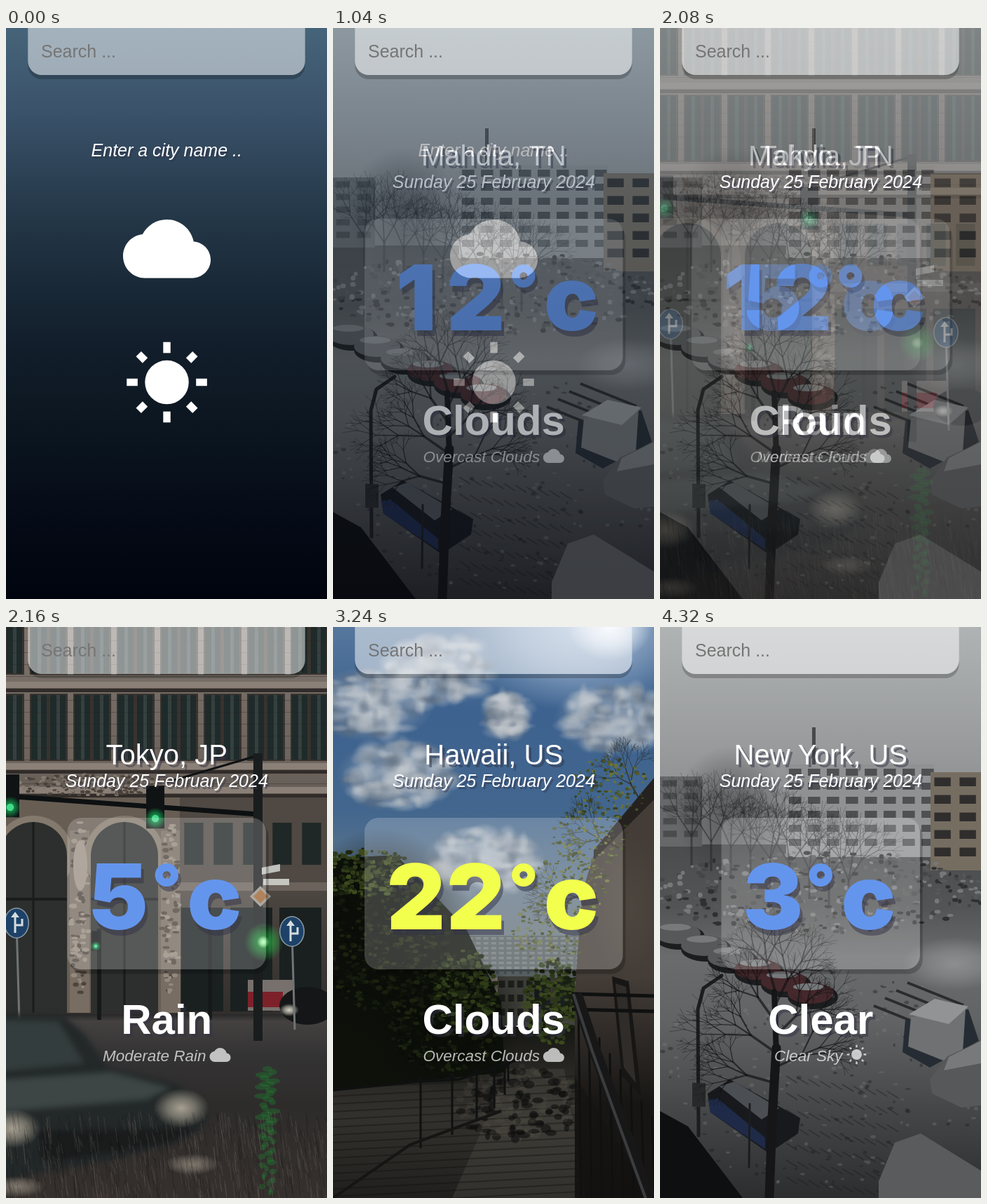
An HTML page with a canvas that plays this animation: 458x814 px, repeating every 5320 ms.

```html
<!DOCTYPE html>
<html lang="en">
<head>
<meta charset="utf-8">
<title>Weather</title>
<style>
html, body { margin: 0; width: 100%; height: 100%; overflow: hidden; background: #000; }
canvas { display: block; }
</style>
</head>
<body>
<canvas id="stage" width="458" height="814"></canvas>
<script>
const W = 458, H = 814, MID = 229.25, TAU = Math.PI * 2;
const SANS = '"Liberation Sans", Arial, sans-serif';
const HEAVY = 'Inter, Roboto, sans-serif';
let c, seed;

const rnd = () => (seed = (seed * 16807) % 2147483647) / 2147483647;
const between = (a, b) => a + (b - a) * rnd();

// ---- drawing helpers ----
function rect(color, x, y, w, h) {
  c.fillStyle = color;
  c.fillRect(x, y, w, h);
}
function poly(color, ...p) {
  c.fillStyle = color;
  c.beginPath();
  for (let i = 0; i < p.length; i += 2) c.lineTo(p[i], p[i + 1]);
  c.fill();
}
function line(color, width, ...p) {
  c.strokeStyle = color;
  c.lineWidth = width;
  c.beginPath();
  for (let i = 0; i < p.length; i += 2) c.lineTo(p[i], p[i + 1]);
  c.stroke();
}
function oval(color, x, y, rx, ry = rx) {
  c.fillStyle = color;
  c.beginPath();
  c.ellipse(x, y, rx, ry, 0, 0, TAU);
  c.fill();
}
// soft spot; rgb is "r,g,b"
function glow(rgb, alpha, x, y, rx, ry = rx) {
  c.save();
  c.translate(x, y);
  c.scale(rx, ry);
  const g = c.createRadialGradient(0, 0, 0, 0, 0, 1);
  g.addColorStop(0, `rgba(${rgb},${alpha})`);
  g.addColorStop(0.5, `rgba(${rgb},${alpha * 0.6})`);
  g.addColorStop(1, `rgba(${rgb},0)`);
  c.fillStyle = g;
  c.fillRect(-1, -1, 2, 2);
  c.restore();
}
// vertical gradient; stops alternate y and colour
function shade(x, w, ...stops) {
  const y0 = stops[0], h = stops[stops.length - 2] - y0;
  const g = c.createLinearGradient(0, y0, 0, y0 + h);
  for (let i = 0; i < stops.length; i += 2) g.addColorStop((stops[i] - y0) / h, stops[i + 1]);
  rect(g, x, y0, w, h);
}
// calls put(x, y, i) at n random places inside an ellipse
function spread(n, x, y, rx, ry, put) {
  for (let i = 0; i < n; i++) {
    const a = rnd() * TAU, d = Math.sqrt(rnd());
    put(x + Math.cos(a) * d * rx, y + Math.sin(a) * d * ry, i);
  }
}
function dabs(n, colors, x, y, rx, ry, size) {
  spread(n, x, y, rx, ry, (px, py, i) =>
    oval(colors[i % colors.length], px, py, size * between(0.5, 1.3), size * between(0.4, 0.9)));
}
function branch(color, x, y, len, angle, width, depth) {
  const x2 = x + Math.cos(angle) * len, y2 = y + Math.sin(angle) * len;
  line(color, width, x, y, x2, y2);
  if (!depth) return;
  for (const turn of [-0.5, 0.05, 0.55])
    branch(color, x2, y2, len * between(0.6, 0.88), angle + turn + between(-0.2, 0.2),
      Math.max(0.5, width * 0.62), depth - 1);
}
function building(x, y, w, h, wall, pane, dx, dy) {
  rect(wall, x, y, w, h);
  for (let py = y + dy * 0.3; py < y + h - dy * 0.5; py += dy)
    for (let px = x + dx * 0.15; px < x + w - dx * 0.5; px += dx) rect(pane, px, py, dx * 0.65, dy * 0.5);
}

// ---- backdrops ----
function night() {
  shade(0, W, 0, '#466479', 120, '#3a526a', 250, '#263a4b', 350, '#1b2b3a', 450, '#121e2b',
    550, '#0c1721', 620, '#09121c', 680, '#060c18', H, '#00040e');
}

function snow() {
  shade(0, W, 0, '#b0b3b4', 70, '#a6a9aa', 180, '#97999b', 320, '#808183');
  shade(0, W, 310, '#4b4c4d', 400, '#535455', 470, '#6a6b6c', 560, '#626364', 680, '#474849', H, '#2c2d2f');

  building(0, 213, 60, 100, '#66686a', '#4a4c4e', 30, 18);
  building(180, 196, 212, 132, '#8f9192', '#4e5052', 27, 20);
  building(386, 207, 72, 140, '#766d61', '#302e2d', 36, 25);
  rect('#47494b', 217, 143, 5, 53);

  // bare park
  glow('45,46,48', 0.5, 100, 265, 80, 95);
  dabs(500, ['#2f3031', '#454647', '#77787a', '#565758'], MID, 378, 240, 58, 4);
  for (let i = 0; i < 9; i++)
    branch('rgba(38,39,41,.55)', 45 + i * 28, 340 + i * 8, 42, -1.57, 3, 4);
  glow('150,151,153', 0.8, 420, 480, 75, 38);

  // row of parked cars
  for (let i = 0; i < 6; i++) {
    const x = 25 + i * 38, y = 437 + i * 17;
    oval('#1c1d1f', x + 3, y + 5, 36, 18);
    oval(i > 2 ? '#44282b' : '#56585a', x, y, 33, 15);
    oval('#77797b', x - 3, y - 9, 22, 5);
  }
  dabs(260, ['rgba(30,31,33,.4)', 'rgba(130,131,133,.3)'], MID, 640, 240, 160, 3);
  for (let i = 0; i < 70; i++)
    line('rgba(28,29,31,.45)', 1.5, 180 + (i % 10) * 16, 640 + i * 2.4, 196 + (i % 10) * 16, 650 + i * 2.4);

  // trailer, cars, ledge
  for (let i = 0; i < 4; i++) line('#2b2c2e', 4, 305 + i * 16, 540 - i * 11, 385 + i * 16, 572 - i * 11);
  poly('#262c33', 350, 560, 440, 545, 455, 590, 385, 628, 346, 606);
  poly('#6f7173', 358, 556, 436, 545, 432, 605, 404, 618, 354, 598);
  poly('#919395', 355, 552, 392, 530, 440, 541, 412, 566);
  poly('#56585a', 385, 645, 410, 612, 458, 590, 458, 682, 430, 685, 388, 665);
  poly('#77797b', 412, 613, 458, 590, 458, 622, 405, 632);
  poly('#17191d', 68, 665, 100, 645, 200, 700, 197, 722, 155, 750, 72, 692);
  poly('#1e2a48', 69, 674, 82, 672, 150, 728, 150, 744, 72, 692);
  poly('#4b4e52', 85, 655, 106, 648, 170, 686, 145, 702);
  poly('#5a5b5d', 312, 790, 335, 735, 372, 722, 458, 775, 458, H, 312, H);
  poly('#0e0f11', 0, 690, 40, 712, 118, H, 0, H);

  // lamp and the big tree
  c.lineCap = 'round';
  line('#1c1d1f', 5, 55, 725, 54, 545, 62, 515, 88, 497);
  rect('#27292a', 46, 650, 19, 34);
  line('#1c1d1f', 3, 127, 770, 128, 680);
  line('#161618', 13, 156, H, 160, 700, 166, 600);
  line('#161618', 8, 166, 610, 163, 520);
  for (let i = 0; i < 7; i++) {
    const side = i % 2 ? 1 : -1;
    branch('rgba(20,20,22,.7)', 164, 650 - i * 22, 42, -1.57 + side * (1.3 - i * 0.17), 3.5, 4);
  }
}

function streetSign(x, y) {
  line('#6f7476', 3, x, y, x + 4, y + 140);
  oval('#8d9aa3', x, y, 18, 22);
  oval('#1d4269', x, y, 16.5, 20.5);
  line('#d5dce0', 3, x - 2, y + 14, x - 2, y - 10);
  line('#d5dce0', 3, x - 2, y + 3, x + 8, y + 3, x + 8, y - 6);
  poly('#d5dce0', x - 8, y - 8, x - 2, y - 16, x + 4, y - 8);
}
function trafficLight(x, y, size) {
  rect('#101314', x - size, y - size * 3.6, size * 2, size * 4.7);
  glow('20,190,90', 0.9, x, y, size * 1.2);
  oval('#45d98c', x, y, size * 0.4);
}
function rain() {
  shade(0, W, 0, '#7b736c', 200, '#6b635c', 390, '#4a443f', 560, '#302d2b');
  // upper floors
  for (let x = -26; x < W; x += 62)
    for (const y of [-26, 97]) {
      rect('#38332f', x - 2, y - 2, 54, 96);
      for (const px of [x, x + 27]) {
        rect('#1f2a2a', px, y, 22, 92);
        rect('#35413f', px + 9, y, 5, 92);
      }
    }
  for (let y = 2; y < 240; y += 17) rect('rgba(40,35,32,.35)', 0, y, W, 1);
  for (const y of [78, 194, 228]) {
    rect('#8a8077', 0, y, W, 9);
    rect('#312c29', 0, y + 10, W, 5);
  }
  dabs(220, ['#857a6f', '#4a423b'], 122, 225, 122, 15, 3);

  // arcade on the left, shop front on the right
  rect('#675d53', 0, 243, 248, 307);
  for (const x of [39, 169]) {
    oval('#84796d', x, 326, 57);
    oval('#2c2f2d', x, 326, 48);
    rect('#2c2f2d', x - 48, 326, 96, 224);
    line('#1a1c1b', 3, x, 278, x, 550);
    line('#1a1c1b', 4, x - 48, 388, x + 48, 388);
    rect('#776d62', x + 52, 290, 28, 260);
    dabs(90, ['#94897c', '#4d443c'], x + 66, 400, 13, 125, 4);
  }
  oval('#9b9184', 106, 340, 10, 36);
  building(248, 243, 210, 120, '#4f4843', '#202827', 42, 120);
  rect('#6a625b', 248, 364, 210, 12);
  for (let x = 250; x < W; x += 70) rect('#1a2020', x, 400, 60, 148);

  shade(0, W, 552, '#282727', 562, '#444140', 610, '#343334', 680, '#2e2c2b', H, '#35302d');
  rect('#77706d', 345, 503, 66, 44);
  rect('#7d2029', 345, 520, 50, 22);
  oval('#151617', 430, 540, 40, 27);
  glow('235,230,215', 0.9, 404, 546, 14, 9);

  // poles, signals, signs
  line('#0d1011', 7, 0, 241, 360, 267);
  line('#101214', 3, 227, 222, 360, 183);
  rect('#1a1d1e', 353, 180, 13, 410);
  for (const x of [130, 288]) rect('#161919', x, 430, 6, 130);
  trafficLight(6, 257, 13);
  trafficLight(213, 273, 13);
  trafficLight(128, 455, 6);
  trafficLight(368, 449, 6);
  glow('40,190,70', 0.8, 368, 449, 28);
  glow('190,255,190', 1, 367, 449, 9);
  streetSign(15, 422);
  streetSign(408, 434);
  poly('#98938a', 363, 369, 378, 384, 363, 399, 348, 384);
  poly('#9c6433', 363, 374, 373, 384, 363, 394, 353, 384);
  poly('#bfc0bb', 365, 343, 391, 338, 391, 348, 365, 353);
  rect('#c6c6c1', 367, 359, 37, 9);

  // wet road
  for (let i = 0; i < 42; i++)
    oval('rgba(25,135,45,.35)', 373 + Math.sin(i * 1.9) * 8, 630 + i * 4.3, between(6, 16) * (1 - i / 60), 4);
  // passing car
  c.filter = 'blur(4px)';
  poly('#232828', -9, 551, 82, 554, 112, 580, 145, 628, 245, 652, 290, 688, 283, 712, 240, 735, 150, 760, -9, 790);
  poly('#343d3d', -9, 560, 75, 562, 112, 622, -9, 634);
  poly('#3d4545', -9, 645, 150, 634, 235, 657, 200, 674, -9, 692);
  poly('#1a1c1c', 45, 718, 275, 714, 235, 735, 50, 765);
  c.filter = 'none';
  for (const [x, y] of [[250, 686], [10, 715], [265, 766], [15, 798]])
    glow('200,190,172', y < 740 ? 0.8 : 0.5, x, y, 40, y < 740 ? 28 : 15);
  for (let i = 0; i < 700; i++) {
    const x = rnd() * W, y = between(690, 810);
    line(i % 2 ? 'rgba(150,140,130,.2)' : 'rgba(15,14,14,.25)', 1, x, y, x + 3, y + between(8, 32));
  }
}

function puff(x, y, rx, ry) {
  glow('165,174,184', 0.8, x, y, rx * 1.2, ry * 1.2);
  spread(110, x, y, rx, ry, (px, py, i) =>
    glow(i % 3 ? '196,201,206' : '88,104,122', 0.45, px, py, between(6, 26), between(5, 18)));
}
function foliage(n, colors, x, y, rx, ry) {
  glow('9,12,7', 1, x, y, rx * 1.4, ry * 1.4);
  dabs(n, colors, x, y, rx, ry, 4);
}
function island() {
  shade(0, W, 0, '#56779d', 120, '#3d628f', 260, '#42668e', 380, '#66798a', 470, '#6a7377');
  glow('205,220,240', 0.7, 350, 0, 170, 120);
  for (const [x, y] of [[55, 110], [150, 60], [95, 210], [405, 130], [215, 335]]) puff(x, y, 75, 45);
  puff(247, 125, 22, 30);
  glow('245,250,255', 1, 395, 0, 60, 48);

  building(180, 440, 190, 60, '#555e60', '#70787a', 11, 7);
  building(235, 498, 52, 70, '#3d3d38', '#1d1e1b', 13, 20);

  // stairs
  shade(0, W, 570, '#161613', 640, '#2a2925', 700, '#33312d', H, '#201f1d');
  poly('rgba(85,80,72,.35)', 250, 630, 330, 630, 360, H, 170, H);
  for (let y = 640; y < H; y += 11) line('rgba(16,16,15,.4)', 2, 0, y + 18, 350, y);
  dabs(170, ['rgba(14,14,13,.6)', 'rgba(90,85,76,.2)'], 265, 680, 90, 55, 7);

  // greenery
  const dark = ['#0d110a', '#13190d', '#1b220f', '#090c07'];
  poly('#0d110a', 0, 330, 90, 325, 190, 430, 240, 535, 245, 635, 0, 660);
  foliage(700, dark, 70, 440, 95, 110);
  foliage(500, dark, 160, 560, 80, 75);
  dabs(220, ['#2f3c18', '#3c4a1d', '#1d2711'], 45, 350, 75, 34, 4);
  dabs(260, ['#2f3c18', '#1d2711', '#11170b'], 190, 520, 45, 60, 4);
  dabs(300, ['#2c3817', '#181f0f', '#3b481f'], 315, 535, 42, 62, 4);

  // wall and overhanging tree
  poly('#433c37', 458, 220, 372, 325, 355, 380, 345, 520, 345, 640, 458, H);
  poly('#25211f', 458, 215, 372, 318, 372, 332, 458, 246);
  glow('92,82,72', 0.4, 425, 400, 55, 110);
  shade(345, 113, 500, 'rgba(16,15,14,0)', 680, 'rgba(16,15,14,.85)', H, 'rgba(16,15,14,.85)');
  for (let i = 0; i < 3; i++) branch('rgba(42,38,28,.8)', 440 - i * 32, 250 + i * 65, 30, -2.1 - i * 0.6, 2, 4);
  for (let i = 0; i < 4; i++)
    dabs(130, ['#515a2c', '#6a7238', '#363f20', '#44502a'], 395 - i * 28, 230 + i * 68, 55, 45, 2.6);
  poly('#171615', 398, 498, 422, 505, 440, 670, 412, 640);
  poly('#2f2c29', 403, 508, 418, 513, 432, 650, 415, 628);

  // railings
  const iron = '#0f1010';
  for (const y of [523, 545]) line(iron, 5, 341, y, W, y + 3);
  for (let x = 350; x < W; x += 15) line(iron, 3, x, 540 + (x - 350) * 1.5, x + 4, H);
  line('#171717', 17, 347, 523, 372, 600, 452, H);
  line('#3b3c3e', 4, 343, 523, 370, 605, 446, H);
  line(iron, 4, 0, 660, 120, 648, 180, 645, 260, 618);
  for (let i = 0; i < 6; i++) {
    const x = 250 - i * i * 5, y = 620 + i * 5;
    line(iron, 3, x, y, x, y + 28 + i * 14);
    oval(iron, x, y, 4.5);
  }
  line('#151514', 4, 0, H, 110, 738, 240, 690);
}

// ---- interface ----
function text(str, x, y, font, color, dx = 0, dy = dx) {
  c.font = font;
  if (dx) {
    c.fillStyle = 'rgba(50,50,70,.5)';
    c.fillText(str, x + dx, y + dy);
  }
  c.fillStyle = color;
  c.fillText(str, x, y);
}
function centered(str, y, font, color, d) {
  c.textAlign = 'center';
  text(str, MID, y, font, color, d);
  c.textAlign = 'left';
}
function panel(x, y, w, h, radii, fill, dx, dy) {
  const box = new Path2D(), outside = new Path2D(), drop = new Path2D();
  box.roundRect(x, y, w, h, radii);
  outside.rect(0, 0, W, H);
  outside.addPath(box);
  drop.roundRect(x + dx, y + dy, w, h, radii);
  c.save();
  c.clip(outside, 'evenodd');
  c.fillStyle = 'rgba(0,0,0,.22)';
  c.fill(drop);
  c.restore();
  c.fillStyle = fill;
  c.fill(box);
}
const cloudPath = new Path2D('M19.35 10.04C18.67 6.59 15.64 4 12 4 9.11 4 6.6 5.64 5.35 8.04 2.34 8.36 0 10.91 0 14c0 3.31 2.69 6 6 6h13c2.76 0 5-2.24 5-5 0-2.64-2.05-4.78-4.65-4.96z');
function icon(kind, x, y, scale, color) {
  c.save();
  c.translate(x, y);
  c.scale(scale, scale);
  c.fillStyle = color;
  if (kind === 'cloud') c.fill(cloudPath);
  else {
    c.translate(12, 11.5);
    oval(color, 0, 0, 6);
    for (let i = 0; i < 8; i++) {
      if (i % 2) c.fillRect(8.42, -1, 2.53, 2);
      else c.fillRect(8, -1, 3, 2);
      c.rotate(TAU / 8);
    }
  }
  c.restore();
}
function degrees(str, color) {
  const cell = ch => ch === '°' ? 51 : 85.2;
  const width = [...str].reduce((sum, ch) => sum + cell(ch), 0);
  panel(MID - width / 2 - 31, 272, width + 62, 216, 20, 'rgba(255,255,255,.2)', 3.75, 6.5);
  c.textAlign = 'center';
  let x = MID - width / 2;
  for (const ch of str) {
    // the degree ring is smaller and hangs from the cap line
    const size = ch === '°' ? 92 : 129;
    text(ch, x + cell(ch) / 2, 431 - (129 - size) * 0.73, `900 ${size}px ${HEAVY}`, color, 3.75, 7.5);
    x += cell(ch);
  }
  c.textAlign = 'left';
}
function report(place, temp, color, sky, detail, kind) {
  const soft = 'rgba(255,255,255,.7)';
  centered(place, 196, `40px ${SANS}`, '#fff', 3.75);
  centered('Sunday 25 February 2024', 228, `italic 25px ${SANS}`, '#fff', 2.5);
  degrees(temp, color);
  centered(sky, 580, `bold 60px ${SANS}`, '#fff', 3.75);
  c.font = `italic 22.5px ${SANS}`;
  const w = c.measureText(detail).width, x = MID - (w + 35) / 2;
  text(detail, x, 619, c.font, soft);
  icon(kind, x + w + 5, 595, 1.25, soft);
}
function welcome() {
  centered('Enter a city name ..', 183, `italic 25px ${SANS}`, '#fff', 2.5);
  icon('cloud', 167, 252.2, 5.21, '#fff');
  icon('sun', 167, 445.1, 5.21, '#fff');
}

function scene(backdrop, content) {
  const layer = document.createElement('canvas');
  layer.width = W;
  layer.height = H;
  c = layer.getContext('2d');
  seed = 4711;
  backdrop();
  panel(31.25, -20, 395.5, 87, [0, 0, 20, 20], 'rgba(255,255,255,.5)', 0, 6);
  text('Search ...', 50, 42, `25px ${SANS}`, '#757575');
  content();
  return layer;
}

const BLUE = '#6495ed', YELLOW = '#f2ff4d';
const scenes = [
  scene(night, welcome),
  scene(snow, () => report('Mahdia, TN', '12°c', BLUE, 'Clouds', 'Overcast Clouds', 'cloud')),
  scene(rain, () => report('Tokyo, JP', '5°c', BLUE, 'Rain', 'Moderate Rain', 'cloud')),
  scene(island, () => report('Hawaii, US', '22°c', YELLOW, 'Clouds', 'Overcast Clouds', 'cloud')),
  scene(snow, () => report('New York, US', '3°c', BLUE, 'Clear', 'Clear Sky', 'sun'))
];

// ---- playback: hold, then a fade in steps of a third ----
const HOLD = 1000, STEP = 40, SPAN = HOLD + 2 * STEP, LOOP = 5320;
const stage = document.getElementById('stage').getContext('2d');
function draw() {
  const t = performance.now() % LOOP;
  const i = Math.floor(t / SPAN), late = t - i * SPAN - HOLD;
  stage.globalAlpha = 1;
  stage.drawImage(scenes[i], 0, 0);
  if (late >= 0 && i + 1 < scenes.length) {
    stage.globalAlpha = (Math.floor(late / STEP) + 1) / 3;
    stage.drawImage(scenes[i + 1], 0, 0);
  }
  requestAnimationFrame(draw);
}
draw();
</script>
</body>
</html>
```
